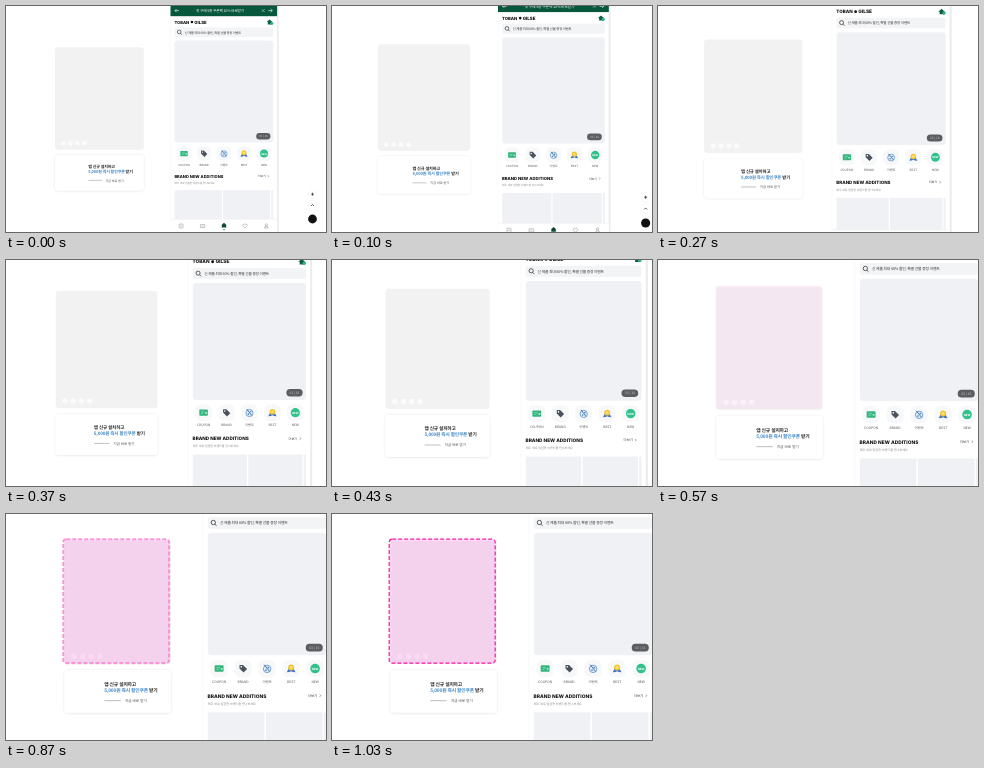
Write an HTML page that moves like this. It is 320x226 px and loops after 2060 ms.

```html
<!DOCTYPE html>
<html lang="ko">
<head>
<meta charset="utf-8">
<title>Zoom and highlight</title>
<style>
html, body { margin: 0; width: 100%; height: 100%; overflow: hidden; background: #fff; }
svg { display: block; width: 100%; height: 100%; }
text { font-family: "Noto Sans CJK KR", "Noto Sans CJK", sans-serif; text-rendering: geometricPrecision; }
.latin { font-family: Inter, sans-serif; }
</style>
</head>
<body>
<svg viewBox="0 0 320 226" preserveAspectRatio="xMidYMid meet">
  <defs>
    <filter id="soft" x="-15%" y="-25%" width="130%" height="160%">
      <feDropShadow dx="0" dy=".3" stdDeviation=".9" flood-opacity=".13"/>
    </filter>
  </defs>
  <g id="scene"></g>
  <rect id="fill" x="57.2" y="25.2" width="106" height="124" rx="3" fill="#ff14d2"/>
  <rect id="dash" x="57.2" y="25.2" width="106" height="124" rx="3" fill="none" stroke="#f7189f" stroke-dasharray="4 2"/>
</svg>
<script>
const LOOP = 2060, STEP = 100 / 3;
const $ = id => document.getElementById(id);
const clamp = v => Math.max(0, Math.min(1, v));

const box = (x, y, w, h, fill, r = 0, more = '') =>
  `<rect x="${x}" y="${y}" width="${w}" height="${h}" rx="${r}" fill="${fill}" ${more}/>`;
const disc = (x, y, r, fill, more = '') =>
  `<circle cx="${x}" cy="${y}" r="${r}" fill="${fill}" ${more}/>`;
const line = (d, color, w = .6) =>
  `<path d="${d}" fill="none" stroke="${color}" stroke-width="${w}"/>`;
const shape = (d, fill) => `<path d="${d}" fill="${fill}"/>`;
const text = (x, y, size, fill, str, more = '') =>
  `<text x="${x}" y="${y}" font-size="${size}" fill="${fill}" ${more}>${str}</text>`;
const at = (x, y, body) => `<g transform="translate(${x} ${y})">${body}</g>`;
const MID = 'text-anchor="middle"';
const BOLD = 'font-weight="700" letter-spacing="-.17"';
const HEAVY = 'class="latin" font-weight="800"';

function banner() {
  return box(49, 41.2, 88.8, 102.5, '#f2f2f2', 3)
    + [57.2, 64.3, 71.4, 78.5].map(x => box(x - 2.3, 135, 4.6, 4.6, '#fff', 1.8, 'opacity=".7"')).join('')
    + box(49, 148.9, 88.8, 35.6, '#fff', 3, 'filter="url(#soft)"')
    + text(82.3, 161.9, 4, '#222', '앱 신규 설치하고', BOLD)
    + text(82.3, 167, 4, '#222', '<tspan fill="#3d86c6">5,000원 즉시 할인쿠폰</tspan> 받기', BOLD)
    + line('M82.4 174.4H96', '#777', .4)
    + text(99.5, 175.5, 3, '#444', '지금 바로 받기');
}

function topBar() {
  return box(164.5, -2, 106.6, 12.2, '#07573c')
    + line('M173 4.6h-4m1.6-1.6-1.6 1.6 1.6 1.6', '#fff')
    + text(214, 6, 3.7, '#fff', '첫 구매 5종 쿠폰팩 10% 바로받기', MID + ' font-weight="500" letter-spacing="-.2"')
    + line('m255.9 3.2 2.8 2.8m0-2.8-2.8 2.8', '#cfe3da', .5)
    + line('M262.3 4.6h4m-1.6-1.6 1.6 1.6-1.6 1.6', '#fff')
    + text(168.4, 17.5, 4.1, '#111', 'TOBAN', HEAVY)
    + disc(185.9, 16, 1.3, '#111')
    + text(188.3, 17.5, 4.3, '#111', 'GILSE', HEAVY)
    + shape('M260.6 16l3-2.6 2.8 2.6v2.4h-4.6V16z', '#0b5f44')
    + disc(265.8, 17.2, 1.5, '#2fb37d')
    + box(168.6, 21.5, 98.7, 9.6, '#f3f4f6', 1.6)
    + disc(173.2, 25.9, 1.8, 'none', 'stroke="#222" stroke-width=".6"')
    + line('m174.5 27.3 1.4 1.4', '#222')
    + text(178.7, 27.5, 3.2, '#333', '신 제품 최대 60% 할인, 특별 선물 증정 이벤트', 'letter-spacing="-.18"');
}

const icons = [
  ['COUPON', box(-3.7, -2.7, 7.4, 5.4, '#33b57c', .6) + box(-2.2, -1, 3, .7, '#8fdcb8') + box(-2.2, .5, 1.8, .6, '#8fdcb8') + disc(2.1, .3, .8, '#bfeed8')],
  ['BRAND', shape('M-3-3h2.9l3.4 3.4-2.9 2.9-3.4-3.4z', '#4a525e') + disc(-1.5, -1.5, .7, '#fff')],
  ['이벤트', disc(0, .3, 3.1, '#e4eefa', 'stroke="#5b94cf" stroke-width=".7"') + line('M-2.4-3.2 2 2.4', '#2d405c', .6) + disc(1, -.8, .7, '#4a86c6') + disc(-.9, 1.3, .7, '#4a86c6')],
  ['BEST', shape('M-3.6 3.2-1.8-.4h3.6l1.8 3.6-2.2-.3L0 2.2l-1.4.7z', '#3f74c9') + disc(0, -.8, 2.5, '#f5c52f') + disc(0, -.8, 1.2, '#ffe27a')],
  ['NEW', disc(0, 0, 4, '#2fc28a') + text(0, .9, 2.4, '#fff', 'NEW', MID + ' class="latin" font-weight="700"')]
];

function content() {
  const menu = icons.map(([label, art], i) => at(178 + 20 * i, 147.6,
    box(-7.2, -7.2, 14.4, 14.4, '#f7f8f9', 5) + art
    + text(0, 12, 2.8, '#555', label, MID))).join('');
  return box(168.6, 34.5, 98.7, 102.1, '#f0f1f5', 3)
    + box(250.2, 127, 14.2, 6.4, '#5c5d60', 3.2)
    + text(257.3, 131.3, 2.8, '#c4c4c6', '03 | 16', MID)
    + menu
    + text(168.4, 171.8, 4.05, '#111', 'BRAND NEW ADDITIONS', HEAVY)
    + text(252, 171.2, 2.8, '#333', '더보기')
    + line('m261.8 169.2 1 1-1 1', '#333', .4)
    + text(168.5, 177.7, 2.6, '#8a8a8a', '매주 새로 입점한 브랜드를 만나보세요', 'letter-spacing="-.05"')
    + box(168.6, 184.2, 47.2, 40, '#f0f1f5')
    + box(217, 184.2, 47.2, 40, '#f0f1f5')
    + box(265.3, 184.2, 2, 40, '#f0f1f5');
}

function navBar() {
  const G = '#8d8d8d';
  return box(164.5, 213.2, 106.6, 20, '#fff')
    + line('M164.5 213.2h106.6', '#e6e6e6', .4)
    + box(173.2, 218, 3.8, 4, 'none', .4, `stroke="${G}" stroke-width=".5"`) + line('M174 220h2.2', G, .5)
    + line('M194.4 218.6h4.4v3h-4.4zM196 220.1h1.4', G, .5)
    + shape('M215.8 218.8l2.2-2 2.2 2v2.6h-4.4z', '#0b4a38') + disc(218, 223.6, .7, '#0b4a38')
    + line('M239 222l-2-2a1.1 1.1 0 0 1 2-1.4 1.1 1.1 0 0 1 2 1.4z', G, .5)
    + disc(260.3, 218.8, 1.1, 'none', `stroke="${G}" stroke-width=".5"`)
    + line('M258.4 222a1.9 1.7 0 0 1 3.8 0z', G, .5);
}

function floating() {
  return [188.2, 199.2].map(y => disc(306.5, y, 4.6, '#fff', 'stroke="#f1f1f1" stroke-width=".4"')).join('')
    + line('M306.5 186.7v3m-1.5-1.5h3', '#222', .7)
    + line('m305 200 1.5-1.5 1.5 1.5', '#222', .7)
    + disc(306.5, 213, 4.4, '#111');
}

const panel = box(164.5, -2, 106.6, 240, '#fff', 0, 'stroke="#f8f8f8" stroke-width=".7"')
  + box(271, -2, 1.7, 240, '#ececec');

$('scene').innerHTML = banner() + panel + topBar() + content() + navBar() + floating();

// Linear zoom about the centre with an accelerating pan, then the outline fades in.
function draw(t) {
  const n = Math.floor((t + 3.4) / STEP);
  const p = clamp(n / 15), s = 1 + .2 * p;
  const dx = 31.5 * p * p - 160 * (s - 1), dy = -113 * (s - 1);
  $('scene').setAttribute('transform', `translate(${dx} ${dy}) scale(${s})`);

  const tint = n < 17 ? 0 : clamp(.35 + .13 * Math.max(0, n - 19));
  const edge = clamp((n - 22) / 9);
  $('fill').setAttribute('opacity', .15 * tint);
  $('dash').setAttribute('opacity', .85 * edge + .15 * edge * edge);
  $('dash').setAttribute('stroke-width', 2.4 - 1.2 * edge);
}

const start = performance.now();
function tick() {
  draw((performance.now() - start) % LOOP);
  requestAnimationFrame(tick);
}
draw(0);
requestAnimationFrame(tick);
</script>
</body>
</html>
```
